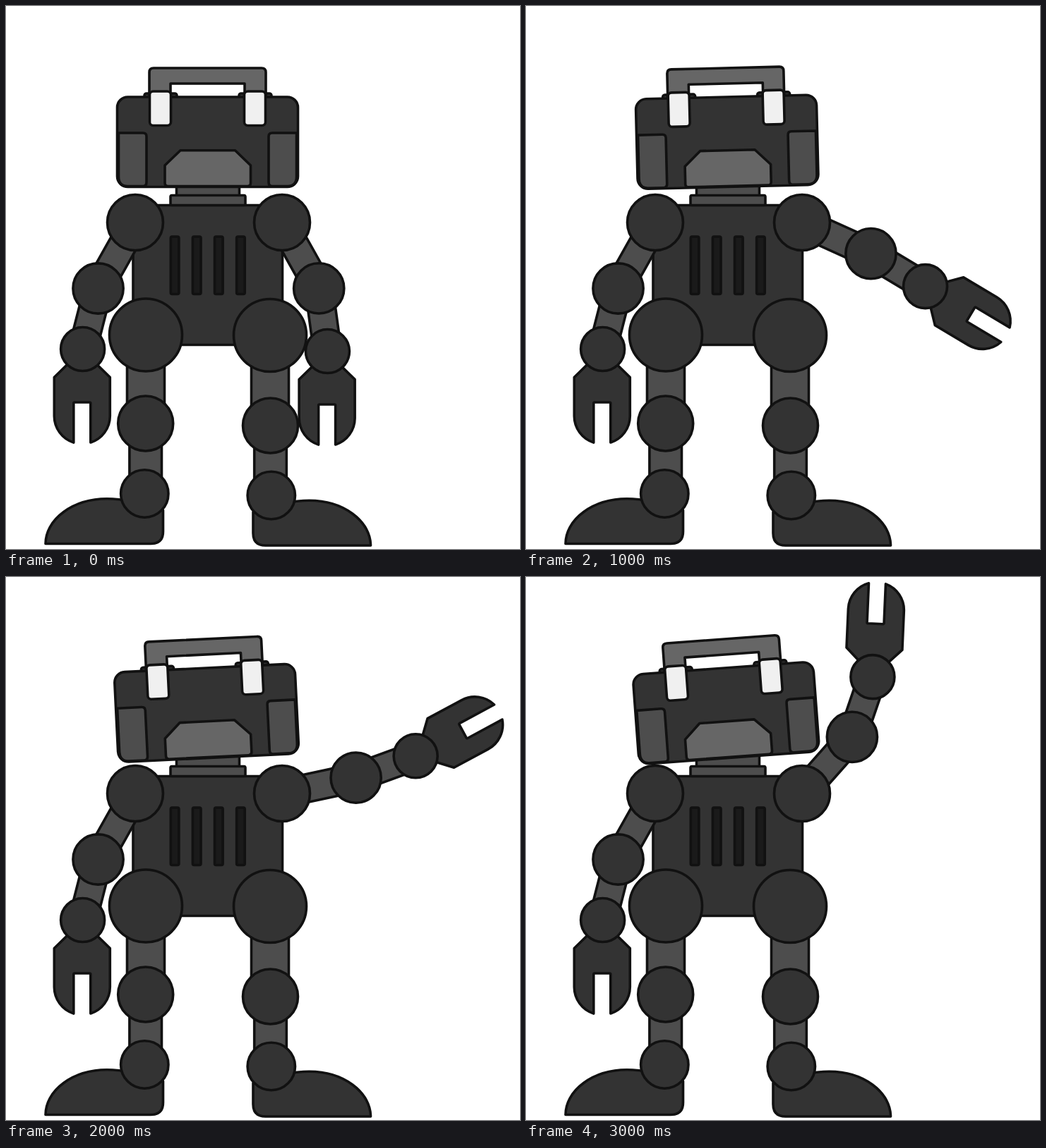
These frames come from a looping animation (728 px wide and 770 px high, 3.1 s). An HTML page:

```html
<!DOCTYPE html>
<html lang="en">
<head>
<meta charset="utf-8">
<title>Waving robot</title>
<style>
  html, body { margin: 0; width: 100%; height: 100%; overflow: hidden; background: #fff; }
  svg { display: block; width: 728px; height: 770px; }
  .dark { fill: #333; }
  .mid { fill: #4d4d4d; }
  .light { fill: #666; }
  .slot { fill: #1a1a1a; }
  .eye { fill: #f0f0f0; }
</style>
</head>
<body>
<svg viewBox="0 0 728 770" stroke="#111" stroke-width="3.6" stroke-linejoin="round">
  <defs>
    <path id="claw" class="dark" d="M-14 15 L-39.5 40 V95 A39.5 39.5 0 0 0 -12 132.5 V77 Q-12 75.5 -10.5 75.5 H10.5 Q12 75.5 12 77 V132.5 A39.5 39.5 0 0 0 39.5 95 V40 L14 15 Z"/>
    <path id="foot" class="dark" d="M56 762.5 A87 64 0 0 1 143 698.8 Q175 699 222.5 715 V745 Q222.5 762.5 205 762.5 Z"/>
  </defs>

  <g id="body">
    <rect class="mid" x="241.5" y="245" width="89" height="24"/>
    <rect class="dark" x="180" y="282.5" width="211.5" height="198"/>
    <rect class="mid" x="233" y="268.5" width="106" height="14" rx="2"/>
  </g>

  <g id="head">
    <rect class="dark" x="196" y="124" width="46" height="14" rx="3"/>
    <rect class="dark" x="330" y="124" width="46" height="14" rx="3"/>
    <path class="light" d="M203 135 V94 Q203 88 209 88 H362 Q368 88 368 94 V135 H338 V110 H233 V135 Z"/>
    <rect class="dark" x="157.5" y="129" width="256" height="127.5" rx="15"/>
    <path class="mid" d="M159.5 180 H194 Q199 180 199 185 V250 Q199 255.5 194 255.5 H172 Q159.5 255.5 159.5 242 Z"/>
    <path class="mid" d="M411.5 180 H377 Q372 180 372 185 V250 Q372 255.5 377 255.5 H399 Q411.5 255.5 411.5 242 Z"/>
    <path class="light" d="M225 226 L247 204.7 H324.5 L346.5 226 V251 Q346.5 255.5 342 255.5 H229.5 Q225 255.5 225 251 Z"/>
    <rect class="eye" x="203.5" y="121" width="30" height="48.5" rx="5"/>
    <rect class="eye" x="337.5" y="121" width="30" height="48.5" rx="5"/>
  </g>

  <g id="arms"></g>
  <g id="legs"></g>
</svg>
<script>
const STEP = 100, STEPS = 31;
const $ = id => document.getElementById(id);

function add(parent, tag, attrs) {
  const el = document.createElementNS('http://www.w3.org/2000/svg', tag);
  for (const k in attrs) el.setAttribute(k, attrs[k]);
  return parent.appendChild(el);
}
const ball = (parent, cx, cy, r) => add(parent, 'circle', { cx, cy, r, class: 'dark' });
const bar = (parent, x, y, width, height) => add(parent, 'rect', { x, y, width, height, class: 'mid' });

// Angles are absolute, in degrees, clockwise from the right.
function makeArm(x, y, upper, fore) {
  const g = add($('arms'), 'g', {});
  const upperBar = bar(g, 0, -19.7, upper, 39.4);
  const foreBar = bar(g, 0, -19.5, fore, 39);
  const claw = add(g, 'use', { href: '#claw' });
  const elbow = ball(g, 0, 0, 35.6);
  const wrist = ball(g, 0, 0, 31);
  ball(g, x, y, 39.5);
  const rad = Math.PI / 180;
  const put = (el, px, py, a) => el.setAttribute('transform', `translate(${px} ${py}) rotate(${a})`);
  return (a, b, c) => {
    const ex = x + upper * Math.cos(a * rad), ey = y + upper * Math.sin(a * rad);
    const wx = ex + fore * Math.cos(b * rad), wy = ey + fore * Math.sin(b * rad);
    put(upperBar, x, y, a);
    put(foreBar, ex, ey, b);
    put(elbow, ex, ey, 0);
    put(wrist, wx, wy, 0);
    put(claw, wx, wy, c - 90);
    claw.setAttribute('x', -0.8);
  };
}

function makeLeg(x, hipY, kneeX, kneeY, ankleX, ankleY, footMove) {
  const g = add($('legs'), 'g', {});
  bar(g, x - 26.5, hipY, 53, kneeY - hipY);
  bar(g, kneeX - 22.8, kneeY, 45.6, ankleY - kneeY);
  add(g, 'use', { href: '#foot', transform: footMove });
  ball(g, x, hipY, 51.5);
  ball(g, kneeX, kneeY, 39);
  ball(g, ankleX, ankleY, 33.7);
}

for (let i = 0; i < 4; i++)
  add($('body'), 'rect', { x: 233.3 + 31.1 * i, y: 327, width: 11.6, height: 81.5, rx: 2, class: 'slot' });

makeLeg(198, 466.5, 197.7, 592, 196.3, 691.5, '');
makeLeg(374, 467, 374.5, 595, 375.8, 694, 'translate(572.5 2.5) scale(-1 1)');

makeArm(183, 307, 107.2, 88.8)(119.3, 104.3, 90);
const wave = makeArm(391, 307, 107, 90);

const mix = (from, to, p) => from + (to - from) * p;

function draw(now) {
  const p = Math.floor(now / STEP) % STEPS / (STEPS - 1);
  wave(mix(60.8, -48.5, p), mix(82.2, -71.2, p), mix(90, -87.5, p));
  $('head').setAttribute('transform', `rotate(${mix(0, -4.2, p)} 285.5 222)`);
}

let start;
function tick(now) {
  start ??= now;
  draw(now - start);
  requestAnimationFrame(tick);
}
draw(0);
requestAnimationFrame(tick);
</script>
</body>
</html>
```
